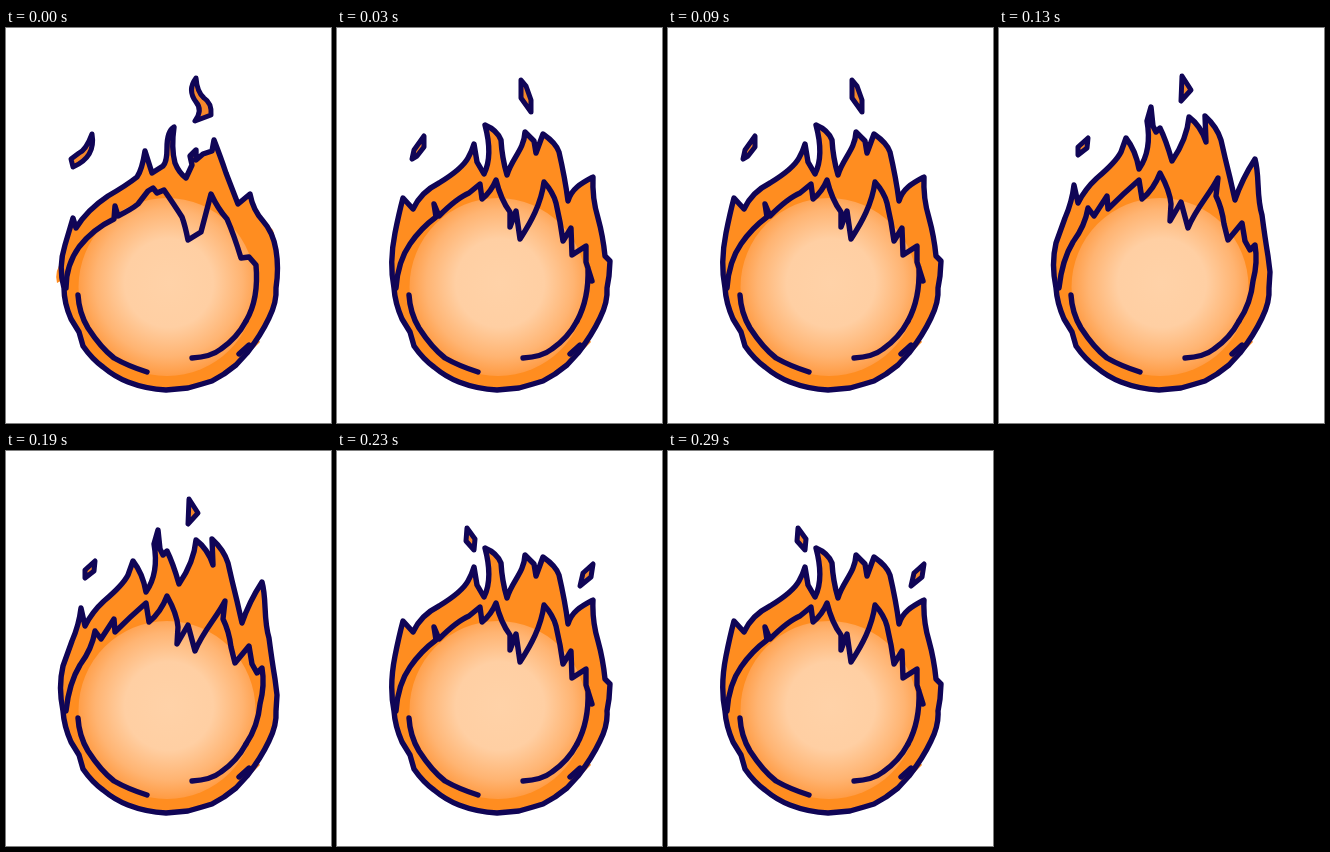
Animation of 325 by 395 pixels, one loop 0.33 s. Source, as an HTML page:

```html
<!DOCTYPE html>
<html lang="en">
<head>
<meta charset="utf-8">
<title>Fireball</title>
<style>
  html, body { margin: 0; width: 100%; height: 100%; overflow: hidden; background: #fff; }
  svg { display: block; width: 100%; height: 100%; }
  .ink { fill: none; stroke: #100556; stroke-width: 5.4; stroke-linecap: round; stroke-linejoin: round; }
  .fire { fill: #ff8d20; }
</style>
</head>
<body>
<svg viewBox="0 0 325 395">
  <defs>
    <radialGradient id="glow" gradientUnits="userSpaceOnUse" cx="163" cy="255" r="92">
      <stop offset="0" stop-color="#ffd2a8"/>
      <stop offset=".48" stop-color="#ffcfa3"/>
      <stop offset=".8" stop-color="#ffb472"/>
      <stop offset="1" stop-color="#ff9c45"/>
    </radialGradient>
  </defs>
  <path id="spill" class="fire"/>
  <path id="body" class="fire"/>
  <ellipse cx="161" cy="259" rx="88.500" ry="89" fill="url(#glow)"/>
  <path id="outer" class="ink"/>
  <path id="inner" class="ink"/>
  <path class="ink" d="M72 267Q73 285 82 300Q95 320 108 330Q122 338 141 344M186 330Q205 329 215 321Q231 310 240 293M233 326L243 317"/>
  <path id="embers" class="ink" style="fill:#f5872a;stroke-width:5"/>
</svg>
<script>
const base = 'Q58 275 65 291L73 304L77 318Q86 331 97 339Q109 349 122 354Q140 361 160 362L182 360L196 356L206 353L218 346L230 337L241 325Q255 307 263 290Q271 274 270 260';
const spills = 'M248 305L254 314L240 328Z';

const tall = {
  outer: 'M57 260Q52 235 58 205Q62 185 66 170L76 181Q84 164 102 155Q125 141 131 130Q135 123 137 116L140 134L147 146C154 132 152 112 148 97Q160 102 164 112Q165 130 170 147C175 130 187 122 188 104L197 113L199 125L206 106Q219 115 222 124Q228 150 231 173C235 160 245 155 256 149Q255 170 261 190Q266 208 268 228L273 233L272 248L270 260',
  inner: 'M59 260Q61 233 73 216Q84 200 99 189L97 176L102 188Q120 170 132 165L143 156L145 171Q154 164 159 152Q164 172 173 184L173 199L179 183L183 211C194 194 204 176 207 154Q216 164 219 175L223 194L226 213L234 200L235 227L249 218L249 234L255 253M251 240Q252 271 240 293'
};

const poses = [
  {
    until: 30,
    outer: 'M58 260Q52 239 59 217L67 190L70 200Q81 182 102 168Q121 157 131 149Q136 142 139 123L146 145L157 138Q161 134 161 120Q161 103 168 99Q165 120 169 135Q173 145 180 150L186 137L184 128L190 122L190 132L197 126L206 123L208 112Q215 130 220 145L232 176L244 166Q247 182 257 193Q267 204 270 222Q273 240 270 260',
    inner: 'M60 260Q60 237 73 219Q87 201 108 191L109 178L112 188Q126 181 132 176L142 163L147 160L151 165L158 162Q169 178 176 189Q179 197 182 212L195 204L205 166Q212 181 221 191Q228 207 235 230L243 229L250 237Q253 271 240 293',
    embers: 'M86 106Q80 122 73 125L65 131L67 139Q90 129 86 106ZM190 50Q181 62 190 74Q197 82 189 93L205 87Q206 75 198 70Q191 64 190 50Z',
    spill: 'M57 232Q48 242 51 255L60 250ZM259 194L267 202L270 214Z'
  },
  {
    until: 130,
    ...tall,
    embers: 'M87 108L87 119L80 128L75 131L77 122ZM184 52L189 58L194 72L194 84L184 70Z'
  },
  {
    until: 230,
    outer: 'M57 260Q52 236 57 215L66 190Q73 174 75 157L79 175Q86 161 98 150Q117 134 122 124L127 110Q137 123 140 141C149 128 151 110 148 93L152 79L154 98L157 104L161 100Q167 112 173 133Q188 111 190 89Q202 98 207 114L206 88Q218 99 222 112Q226 130 231 150L236 172Q243 151 256 131C261 149 257 167 263 187Q266 210 269 228L271 244L270 260',
    inner: 'M60 260Q63 232 74 214Q86 198 89 180L95 188L108 168L109 181Q125 165 140 152L143 171Q155 161 161 145Q171 163 172 176L171 193L182 174L189 200C197 180 211 166 219 150L217 168Q223 180 225 196L229 212L243 195L246 213L251 222L256 217Q259 234 254 253Q252 275 240 293',
    embers: 'M89 110L88 120L79 127L79 119ZM183 48L192 62L182 73Z'
  },
  {
    until: 330,
    ...tall,
    embers: 'M130 77L138 88L137 99L129 90ZM256 113L254 126L243 135L246 122Z'
  }
];

const part = id => document.getElementById(id);
let shown;

function draw(ms) {
  const pose = poses.find(p => ms < p.until);
  if (pose === shown) return;
  shown = pose;
  const set = (id, d) => part(id).setAttribute('d', d);
  const start = pose.outer.match(/^M(\d+ \d+)/)[1];
  set('outer', `${pose.outer}M${start}${base}`);
  set('body', `${pose.outer}L270 260L${start}ZM${start}${base}Z`);
  set('inner', pose.inner);
  set('embers', pose.embers);
  set('spill', spills + (pose.spill || ''));
}

function tick() {
  draw(performance.now() % 330);
  requestAnimationFrame(tick);
}
tick();
</script>
</body>
</html>
```
